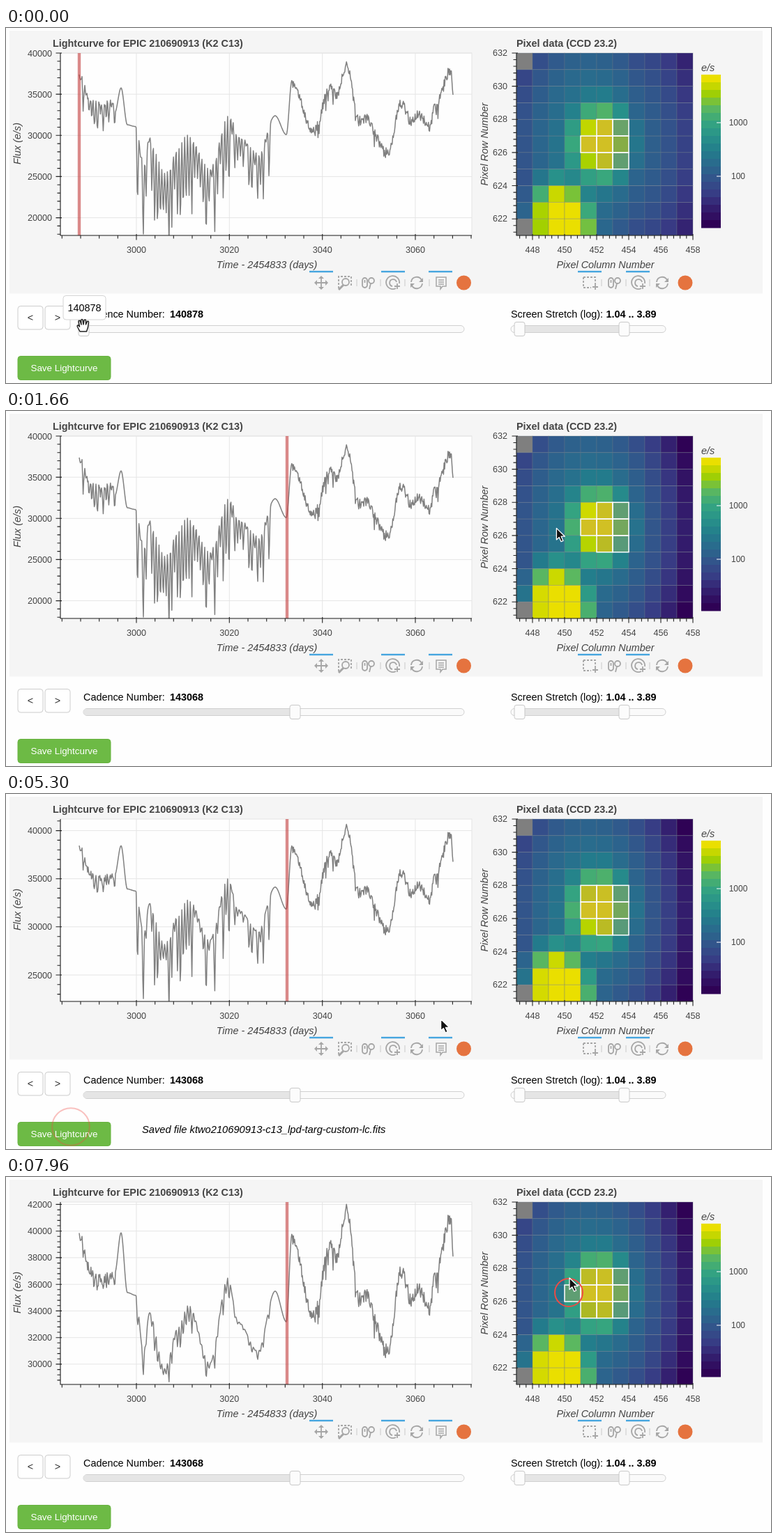
An HTML page that plays this animation: 1097 px wide and 510 px high, repeating every 8000 ms.

```html
<!DOCTYPE html>
<html lang="en">
<head>
<meta charset="utf-8">
<title>Lightcurve viewer</title>
<style>
html, body { margin: 0; width: 100%; height: 100%; overflow: hidden; background: #fefefe; }
svg { display: block; width: 100%; height: 100%; font-family: "Liberation Sans", Arial, sans-serif; font-size: 14.4px; }
.b { font-weight: bold; }
.i { font-style: italic; }
.t { font-size: 12.6px; fill: #444; }
.l { fill: #444; }
.m { text-anchor: middle; }
.e { text-anchor: end; }
.icon { fill: none; stroke: #a6a6a6; stroke-width: 1.8; }
</style>
</head>
<body>
<svg id="stage" viewBox="0 0 1097 510" xmlns="http://www.w3.org/2000/svg"></svg>
<script>
const LOOP = 8000;
const stage = document.getElementById('stage');
const $ = id => document.getElementById(id);
const clamp = (v, a = 0, b = 1) => Math.min(b, Math.max(a, v));
const smooth = u => { u = clamp(u); return u * u * (3 - 2 * u); };
const lerp = (a, b, u) => a + (b - a) * u;
const hash = n => { const s = Math.sin(n * 127.1 + 3.7) * 43758.5453; return s - Math.floor(s); };
const range = n => [...Array(n).keys()];

// Eased position at t along keys of the form [time, ...values]
function along(keys, t) {
  const k = clamp(keys.findIndex(p => p[0] > t), 1, keys.length - 1);
  const a = keys[k - 1], b = t >= keys[keys.length - 1][0] ? keys[keys.length - 1] : keys[k];
  const u = b[0] > a[0] ? smooth((t - a[0]) / (b[0] - a[0])) : 1;
  return a.slice(1).map((v, j) => lerp(v, b[j + 1], u));
}

const rect = (x, y, w, h, more = '') => `<rect x="${x}" y="${y}" width="${w}" height="${h}" ${more}/>`;
const text = (x, y, s, cls = '', more = '') => `<text x="${x}" y="${y}" class="${cls}" ${more}>${s}</text>`;
const path = (d, more = '') => `<path d="${d}" ${more}/>`;

// ---- colours
const stops = ['2f0255', '331b6c', '383a84', '33528b', '2a688d', '237c8c', '28928a', '35a580', '5cb85f', 'a3d000', 'eadf00']
  .map(s => [0, 2, 4].map(k => parseInt(s.slice(k, k + 2), 16)));
function viridis(u) {
  const p = clamp(u) * 10, k = Math.min(9, Math.floor(p));
  return `rgb(${stops[k].map((c, j) => Math.round(lerp(c, stops[k + 1][j], p - k)))})`;
}

// ---- light curve: a slow wave through its turning points, sawtooth dips and noise
const L = 78, R = 668, T = 36, B = 298;
const timeX = d => 187 + (d - 3000) * 6.667;
const turns = [
  [105, 85], [122, 132], [138, 146], [156, 138], [165, 80], [174, 166], [186, 170], [197, 252], [206, 195],
  [227, 275], [247, 215], [262, 183], [292, 268], [318, 145], [333, 208], [361, 250], [386, 164], [402, 208],
  [410, 82], [441, 200], [465, 97], [474, 115], [488, 42], [506, 175], [514, 168], [547, 250], [567, 135],
  [582, 178], [592, 155], [607, 190], [614, 147], [638, 57], [641, 105]];
const baseFlux = x => 30000 + (269 - along(turns, x)[0]) / 19.14 * 1000;

// off: flux lost early, middle and late; amp: depth of the dips there
const curves = {
  A: { off: [2500, 4100, 3100], amp: [4200, 11000, 7500], pow: 0.6, noise: 1250 },
  B: { off: [1400, 1450, 1350], amp: [2300, 10000, 6000], pow: 1.5, noise: 1050 },
  C: { off: [700, 750, 650], amp: [1600, 4800, 3000], pow: 1.4, noise: 1050 },
  D: { off: [0, 0, 0], amp: [1300, 2300, 1000], pow: 1.2, noise: 1100 }
};
const axes = {
  A: { lo: 17850, hi: 40000, step: 5000 },
  B: { lo: 22250, hi: 41200, step: 5000 },
  C: { lo: 25200, hi: 41700, step: 5000 },
  D: { lo: 28480, hi: 42180, step: 2000 }
};
const fluxY = (v, a) => B - (v - a.lo) / (a.hi - a.lo) * (B - T);
function flux(x, i, c) {
  const zone = x < 157 ? 0 : x < 322 ? 1 : 2;
  const dips = x > 109 && x < 157 || x > 186 && x < 380;
  const noisy = x < 157 ? 0.7 : x > 410 ? 1 : 0;
  const k = Math.round(x / 4.1);
  const v = Math.pow(1 - 2 * Math.abs(x / 4.1 - k), 1.3);
  const dip = dips ? c.amp[zone] * v * Math.pow(hash(k), c.pow) : 0;
  const spike = hash(i + 900) > 0.94 ? 1 : 0;
  return baseFlux(x) - c.off[zone] - dip - noisy * c.noise * (hash(i) - 0.45 + spike);
}
const curvePath = (c, a) => 'M' + range(671).map(i => {
  const x = 105 + i * 0.8;
  return x.toFixed(1) + ' ' + fluxY(flux(x, i, c), a).toFixed(1);
}).join('L');
function fluxAxis(a) {
  let grid = '', ticks = '', labels = '';
  const small = a.step / 5;
  for (let v = Math.ceil(a.lo / small) * small; v <= a.hi; v += small) {
    const y = fluxY(v, a).toFixed(1);
    if (v % a.step) ticks += `M${L - 4.5} ${y}H${L}`;
    else {
      grid += `M${L} ${y}H${R}`;
      ticks += `M${L - 6.5} ${y}H${L + 2}`;
      labels += text(66, +y + 4.5, v, 't e');
    }
  }
  return path(grid, 'stroke="#e5e5e5"') + path(ticks, 'stroke="#222" stroke-width="1.1"') + labels;
}

// ---- pixel map: two stars on a soft background, in powers of ten
const HX = 732, HY = 36, CW = 23, CH = 23.82, N = 11;
const cells = range(N * N).map(k => [k % N, Math.floor(k / N)]);
const box = ([c, r]) => rect((HX + c * CW).toFixed(1), (HY + r * CH).toFixed(1), CW, CH);
function cellColor([c, r], drift) {
  if (c === 0 && r % 10 === 0) return '#7f7f7f';
  const dx = c - 2.25 - drift * 0.15, dy = r - 9.8;
  const ex = c - 4.6 - drift * 0.1, ey = r - 4.9;
  const low = 4.6 - 0.27 * (1.8 * dx * dx + dy * dy - 0.5 * dx * dy);
  const main = 4.1 - 0.33 * (1.2 * ex * ex + 0.75 * ey * ey);
  const sky = 2.42 - 0.03 * (c - 4) ** 2 - 0.012 * (r - 5) ** 2 + drift * 0.12 * Math.max(0, c - 7);
  return viridis((Math.log10(10 ** low + 10 ** main + 10 ** sky) - 1.04) / 2.85);
}
// column, row and the time it joins the selection
const picked = [[5, 4, 0], [6, 4, 0], [4, 5, 0], [5, 5, 0], [6, 5, 0], [5, 6, 0], [6, 6, 0],
  [4, 4, 2550], [4, 6, 6700], [3, 5, 7550]];

// ---- fixed parts
function timeAxis() {
  let grid = '', ticks = '', labels = '';
  for (let d = 2984; d <= 3072; d += 4) {
    const x = timeX(d).toFixed(1);
    if (d % 20) ticks += `M${x} ${B}v4.5`;
    else {
      grid += `M${x} ${T}V${B}`;
      ticks += `M${x} ${B - 2}v8.5`;
      labels += text(x, 322.5, d, 't m');
    }
  }
  return path(grid, 'stroke="#e5e5e5"') + path(ticks, 'stroke="#222" stroke-width="1.1"') + labels;
}
function pixelAxes() {
  let d = `M${HX} ${HY}V${B}H985`, labels = '';
  for (let k = 0; k <= 27; k++) {
    const x = HX + (N - k * 0.4) * CW, y = HY + k * 0.4 * CH;
    if (k % 5) d += `M${x} ${B}v4.5M${HX} ${y}h-4.5`;
    else {
      d += `M${x} ${B - 2}v8.5M${HX + 2} ${y}h-8.5`;
      labels += text(x, 322.5, 458 - k / 5 * 2, 't m') + text(719, y + 4, 632 - k / 5 * 2, 't e');
    }
  }
  return path(d, 'fill="none" stroke="#222" stroke-width="1.1"') + labels;
}
const icons = {
  pan: '<path d="M-8 0H8M0-8V8"/><path d="M-10 0l4-4v8zM10 0l-4-4v8zM0-10l-4 4h8zM0 10l-4-4h8z" fill="#a6a6a6" stroke="none"/>',
  zoom: '<path d="M-9 8V-9H9V4" stroke-dasharray="3 2"/><circle cx="1" cy="-1" r="5"/><path d="M-2 3l-7 7" stroke-width="3"/>',
  wheel: '<rect x="-8" y="-7" width="7" height="14" rx="3.5"/><path d="M-4.5-4v4"/><circle cx="5" cy="-3" r="4"/><path d="M4 1l-2 8"/>',
  tap: '<path d="M4 8A9.5 9.5 0 1 1 9 1M-1 5A5 5 0 1 1 5-1M2 5h8M6 1v8"/>',
  reset: '<path d="M-8-1A8 8 0 0 1 7-4M8 1A8 8 0 0 1-7 4"/><path d="M9-7v6H3zM-9 7V1h6z" fill="#a6a6a6" stroke="none"/>',
  hover: '<path d="M-7-8H7V5H2L-1 9V5H-7zM-4-4H4M-4-1H4M-4 2H4" stroke-width="1.5"/>',
  select: '<path d="M-9-8H8V2M-9-8V7H2" stroke-dasharray="3 2"/><path d="M4 6h8M8 2v8"/>'
};
const icon = (name, x) => `<g class="icon" transform="translate(${x} 366)">${icons[name]}</g>`;
const bar = x => rect(x, 348.8, 34, 2.4, 'fill="#45a5df"');
const split = x => path(`M${x} 361v10`, 'stroke="#c9c9c9"');
const dot = x => `<circle cx="${x}" cy="366" r="10.5" fill="#e5733f"/>`;
const toolbar = () =>
  icon('pan', 452) + icon('zoom', 486) + icon('wheel', 519) + icon('tap', 555) + icon('reset', 589) + icon('hover', 624) +
  icon('select', 837) + icon('wheel', 872) + icon('tap', 907) + icon('reset', 941) +
  [435, 538, 606, 820, 889].map(bar).join('') + [503, 537, 572, 607, 854, 889, 923].map(split).join('') + dot(656.5) + dot(974);
const colorBar = () =>
  range(20).map(k => rect(997, 67 + k * 11, 28, 11.4, `fill="${viridis(1 - k / 19)}"`)).join('') +
  path('M1019 136h6M1019 213h6', 'stroke="#fff" stroke-width="1.2"') +
  text(1050, 140, 1000, 'm l', 'font-size="12"') + text(1050, 217, 100, 'm l', 'font-size="12"') + text(997, 62, 'e/s', 'i l');
const button = (x, s) => rect(x, 399.5, 36, 33.5, 'rx="4" fill="#fff" stroke="#ccc"') + text(x + 18, 421, s, 'm', 'fill="#333"');
const track = (x, w) => rect(x, 427.5, w, 10, 'rx="5" fill="#fafafa" stroke="#d0d0d0"');
const knob = (x, id = '') => rect(x - 7.5, 422.5, 15, 20, `rx="3" fill="#fcfcfc" stroke="#c8c8c8" ${id}`);
const hand = d => path(d, 'fill="#fff" stroke="#222" stroke-width="1.5"');

stage.innerHTML =
  `<clipPath id="clip">${rect(L, T, R - L, B - T)}</clipPath>` +
  rect(0, 0, 1097, 510, 'fill="#fefefe"') + rect(5, 4, 1080, 377.5, 'fill="#f5f5f5"') +
  rect(L, T, R - L, B - T, 'fill="#fefefe" stroke="#e5e5e5"') +
  timeAxis() + '<g id="axis"></g>' +
  path('', 'id="curve" clip-path="url(#clip)" fill="none" stroke="#808080" stroke-width="1.5" stroke-linejoin="round"') +
  rect(0, T, 4.4, B - T, 'id="mark" fill="#c43c3c" opacity=".6"') +
  path(`M${L} ${T}V${B}H${R}`, 'fill="none" stroke="#222" stroke-width="1.1"') +
  text(67, 26.5, 'Lightcurve for EPIC 210690913 (K2 C13)', 'b l') +
  text(374, 344.5, 'Time - 2454833 (days)', 'i l m') +
  text(0, 0, 'Flux (e/s)', 'i l m', 'transform="translate(21 166) rotate(-90)"') +
  text(732, 26.5, 'Pixel data (CCD 23.2)', 'b l') +
  text(859.5, 344.5, 'Pixel Column Number', 'i l m') +
  text(0, 0, 'Pixel Row Number', 'i l m', 'transform="translate(691 167) rotate(-90)"') +
  `<g id="cells" stroke="#6e7a85" stroke-opacity=".4" stroke-width=".9">${cells.map(box).join('')}</g>` +
  `<g id="picks" fill="#967878" fill-opacity=".3" stroke="#fff" stroke-width="1.5">${picked.map(box).join('')}</g>` +
  pixelAxes() + colorBar() + toolbar() +
  button(17, '&lt;') + button(56, '&gt;') +
  text(111, 416, 'Cadence Number:') + text(235, 416, '', 'b', 'id="cadence"') +
  track(111, 546) + rect(111.5, 428, 0, 9, 'id="fill" rx="4.5" fill="#e5e5e5"') + knob(0, 'id="knob"') +
  text(724, 416, 'Screen Stretch (log):') + text(860.5, 416, '1.04 .. 3.89', 'b') +
  track(724, 222) + rect(736, 428, 150, 9, 'fill="#e5e5e5"') + knob(736.5) + knob(886.5) +
  rect(17, 471.5, 133, 34, 'id="save" rx="4"') + text(83.5, 492.5, 'Save Lightcurve', 'm', 'fill="#fff" font-size="13.4"') +
  text(195, 487, 'Saved file ktwo210690913-c13_lpd-targ-custom-lc.fits', 'i', 'id="saved" font-size="14.7"') +
  '<g id="tip">' + rect(-30.5, 384.5, 61, 34.5, 'rx="4" fill="#fff" stroke="#d4d4d4"') + text(0, 406.5, '', 'm', 'id="tipText"') + '</g>' +
  '<circle id="ring" fill="none" stroke="#ee4b45" stroke-width="2"/>' +
  '<g id="cursor" stroke-linejoin="round">' +
  path('M0 0V16.5L3.8 13 6.6 19.3 9.6 18 6.8 11.8H12Z', 'fill="#111" stroke="#fff" stroke-width="1.3"') +
  hand('M-5 8L-8.5 1.5Q-9.5-1-7.5-1L-5.5 1-7-6Q-7-8.5-5-7.5L-3-2-3.5-8Q-2.5-10.5-1-8.5L0-2 1-8Q2.5-10 3.5-8L3.5-2 5.5-6.5Q7.5-7.5 7.5-5L6.5 2 4.5 8Z') +
  hand('M-4 7L-7 2Q-7.5-1-5-1L-5-4Q-3.5-6.5-2-4.5 0-7 1.5-4.5 3.5-6 4.5-4 7-4.5 7-2L6 3 4.5 7ZM-2-4v3M1.5-4v3M4.5-3.5v3') +
  hand('M-3 10L-7 3.5Q-8 1-5.5 1.5L-3.5 3.5V-7Q-2-9.5-.5-7V-1Q1.5-2.5 3-.5 5-1.5 6 .5 8 .5 8 2.5L7 7 6 10ZM0 3v4M3 3v4') +
  '</g>';

// ---- motion
const drag = t => smooth((t - 90) / 926);
const moves = [[1016, 414, 433], [1720, 797, 163], [1735, 797, 163], [2030, 835, 144], [2830, 835, 144],
  [3900, 93, 479], [4600, 93, 479], [5640, 800, 272], [6060, 836, 176], [6900, 836, 176],
  [7300, 808, 164], [7550, 808, 164], [7900, 808, 145]];
const cursorAt = t => t < 1016 ? [111 + 303 * drag(t + 67), 428 + 5 * drag(t)] : along(moves, t);
const clicks = [[150, 110, 428], [2330, 835, 145], [4250, 93, 478], [6430, 838, 177], [7340, 807, 166]];
// time, curve, axis
const views = [[0, 'A', 'A'], [2600, 'B', 'A'], [2950, 'B', 'B'], [6750, 'C', 'B'], [7050, 'C', 'C'], [7600, 'D', 'C'], [7880, 'D', 'D']];
const latest = (list, t) => list.filter(e => e[0] <= t).pop();
const set = (el, attrs) => { for (const k in attrs) el.setAttribute(k, attrs[k]); };
const show = (el, on) => { el.style.display = on ? '' : 'none'; };
let shown = null;

function draw(t) {
  const view = latest(views, t);
  if (view !== shown) {
    shown = view;
    $('axis').innerHTML = fluxAxis(axes[view[2]]);
    set($('curve'), { d: curvePath(curves[view[1]], axes[view[2]]) });
  }
  const p = drag(t), late = drag(t - 29), number = 140878 + Math.round(2190 * p), x = 111 + 303 * p;
  $('cadence').textContent = $('tipText').textContent = number;
  set($('knob'), { x: x - 7 });
  set($('fill'), { width: x - 111 });
  set($('mark'), { x: 102.8 + 298 * late });
  show($('tip'), t < 1050);
  set($('tip'), { transform: `translate(${x + 1.5 - 2 * p})` });

  // the pointing drifts while the marker moves
  const flicker = late > 0 && late < 0.85 ? (hash(Math.round(late * 40)) - 0.5) * 0.9 : 0;
  const drift = late < 0.87 ? 1 - 2 * late / 0.87 + flicker : (late - 1) / 0.13;
  cells.forEach((cell, k) => set($('cells').children[k], { fill: cellColor(cell, drift) }));
  picked.forEach((s, k) => show($('picks').children[k], t >= s[2]));

  const [cx, cy] = cursorAt(t);
  const over = cx > 17 && cx < 150 && cy > 471;
  set($('save'), over ? { fill: '#549f30', stroke: '#4c922a' } : { fill: '#6dba45', stroke: '#68b341' });
  show($('saved'), t >= 4230 && t < 6750);
  const kind = t < 100 ? 1 : t < 1016 ? 2 : t < 1060 ? 1 : over ? 3 : 0;
  [...$('cursor').children].forEach((el, k) => show(el, k === kind));
  set($('cursor'), { transform: `translate(${cx.toFixed(1)} ${(cy + (over ? 8 : 0)).toFixed(1)})` });

  const click = latest(clicks, t);
  const age = click ? t - click[0] : LOOP;
  show($('ring'), age < 1180);
  if (age < 1180) set($('ring'), { cx: click[1], cy: click[2], r: 10 + age * 0.016, opacity: clamp((1180 - age) / 380) });
}
const start = performance.now();
function tick() {
  draw((performance.now() - start) % LOOP);
  requestAnimationFrame(tick);
}
tick();
</script>
</body>
</html>
```
